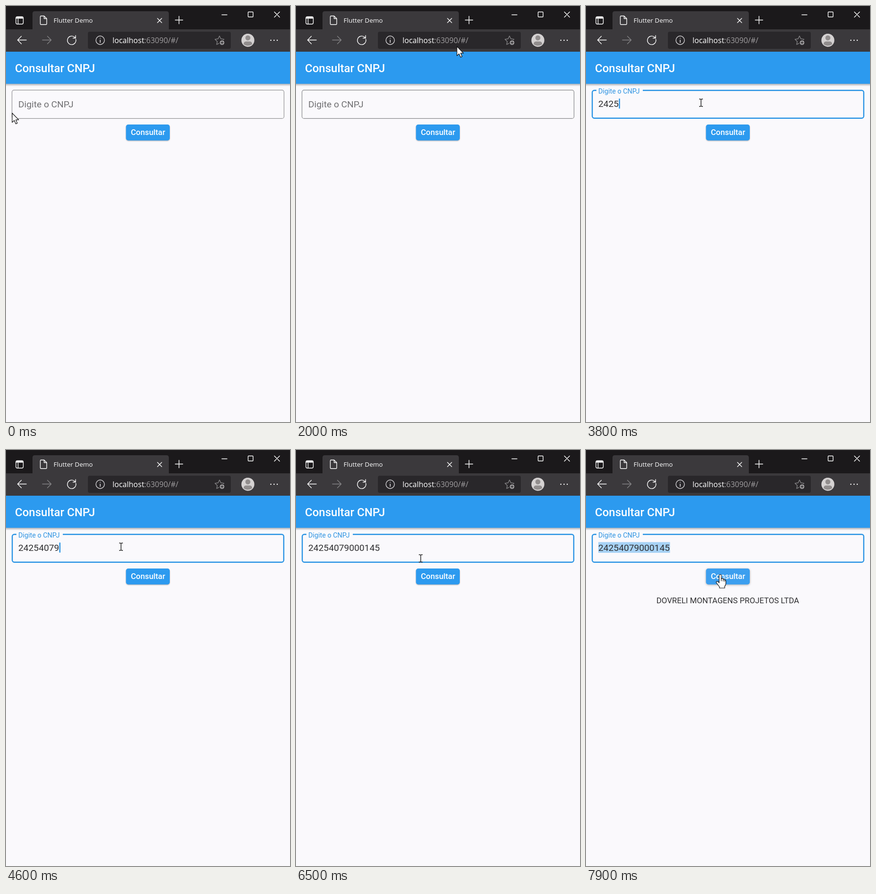
Animation, 600 px wide and 874 px high, one loop 8000 ms. Source, as an HTML page:

```html
<!DOCTYPE html>
<html lang="pt">
<head>
<meta charset="utf-8">
<title>Consultar CNPJ</title>
<style>
  html, body { margin: 0; width: 100%; height: 100%; overflow: hidden; background: #faf9fc; }
  svg { display: block; width: 100%; height: 100%; font-family: Roboto, sans-serif; }
  .chrome { font-family: "Open Sans", sans-serif; }
  .icons { fill: none; stroke: #fff; stroke-width: 1.4; stroke-linecap: round; stroke-linejoin: round; }
  .dim { stroke: #858486; }
  .cursor { fill: #fff; stroke: #111; stroke-width: 1.2; stroke-linejoin: round; }
</style>
</head>
<body>
<svg viewBox="0 0 600 874" preserveAspectRatio="none">
  <defs>
    <linearGradient id="shade" x2="0" y2="1">
      <stop stop-color="#000" stop-opacity=".3"/>
      <stop offset="1" stop-color="#000" stop-opacity="0"/>
    </linearGradient>
    <clipPath id="buttonClip"><rect x="253.5" y="249" width="92.5" height="33.5" rx="4.8"/></clipPath>
  </defs>
  <rect width="600" height="874" fill="#faf9fc"/>

  <!-- Browser window -->
  <g class="chrome">
    <rect width="600" height="50" fill="#1b191b"/>
    <path d="M56 50V16q0-5 5-5H339q5 0 5 5V50z" fill="#3b393c"/>
    <rect y="49" width="600" height="47" fill="#3b393c"/>
    <rect x="173" y="54" width="302" height="36" rx="4" fill="#29272a"/>
    <text x="100.5" y="35" font-size="13.5" fill="#fff">Flutter Demo</text>
    <text x="225" y="78" font-size="16" fill="#fff">localhost<tspan fill="#a09ea0">:63090/#/</tspan></text>
  </g>
  <g class="icons">
    <rect x="21" y="22.5" width="15.5" height="15.5" rx="3"/>
    <path d="M21.5 25.5H36M23 24H35" stroke-width="2"/>
    <path d="M25.5 27V37"/>
    <path d="M73.500 21H80.500L86 26.500V37.500q0 1.500-1.500 1.500H74q-1.500 0-1.500-1.500V22.500q0-1.500 1.500-1.500M80.500 21V26.500H86"/>
    <path d="M320 26l9 9m0-9l-9 9M357.500 29.500h16m-8-8v16M456 18.500h11M567 12.500l11 11m0-11l-11 11"/>
    <rect x="511.500" y="12.500" width="10.500" height="10.500" rx="1"/>
    <path d="M43 71.500H24.500m8-8l-8 8 8 8"/>
    <path class="dim" d="M77 71.500H95.500m-8-8l8 8-8 8"/>
    <path d="M147.500 70A9 9 0 1 1 143.500 64.500L146.500 67M147 62V67.500H141.500"/>
    <circle cx="199" cy="72" r="9" stroke="#d5d3d5"/>
    <path d="M199 71.500v5M199 67.500v.2" stroke="#d5d3d5" stroke-width="1.700"/>
    <path class="dim" d="M451 63l2.900 6 6.600.9-4.800 4.600 1.100 6.500-5.800-3.100-5.900 3.100 1.200-6.500-4.800-4.600 6.600-.9z"/>
    <circle cx="456.500" cy="77" r="5.500" fill="#a3a1a3" stroke="#29272a"/>
    <path d="M454 77h5m-2.500-2.500v5" stroke="#29272a"/>
    <path d="M559.500 72h.1M566.300 72h.1M573 72h.1" stroke-width="2.400"/>
  </g>
  <circle cx="511" cy="72" r="13.700" fill="#d5d2d2"/>
  <circle cx="511" cy="67" r="5.300" fill="#918d8d"/>
  <path d="M502 80.500q0-6 5-6h8q5 0 5 6-9 6-18 0z" fill="#918d8d"/>

  <!-- Page -->
  <rect y="163" width="600" height="6" fill="url(#shade)"/>
  <rect y="96" width="600" height="67.500" fill="#2c9aef"/>
  <text x="19" y="139" font-size="24" font-weight="500" fill="#fff">Consultar CNPJ</text>

  <rect id="border" rx="4.500" fill="none"/>
  <rect id="notch" x="22" y="174" height="6" fill="#faf9fc"/>
  <text id="label" x="26">Digite o CNPJ</text>
  <rect id="selection" x="26" y="193.500" width="151.500" height="22.500" fill="#a7d2f5"/>
  <text id="digits" x="26" y="211.500" font-size="19.200" fill="#303032"></text>
  <rect id="caret" y="194.500" width="2.400" height="21" fill="#2893e4"/>

  <rect id="button" x="253.500" y="249" width="92.500" height="33.500" rx="4.800"/>
  <circle id="ripple" cx="294" cy="266" fill="#fff" clip-path="url(#buttonClip)"/>
  <text x="300" y="271.300" font-size="16.800" font-weight="500" fill="#fff" text-anchor="middle">Consultar</text>

  <path id="spinner" fill="none" stroke="#2c9aef" stroke-width="4.800" stroke-linecap="square"/>
  <text id="result" x="299.500" y="322" font-size="16.800" fill="#303032" text-anchor="middle">DOVRELI MONTAGENS PROJETOS LTDA</text>

  <!-- Pointers, each with its hot spot at 0,0 -->
  <path id="arrow" class="cursor" d="M0 0V19.500L4.500 15.400 7.700 22.600 10.900 21.200 7.800 14.200H13.800z"/>
  <path id="beam" fill="none" stroke="#222" stroke-width="1.500" d="M-4-7.500H-1.500L0-6.500 1.500-7.500H4M0-6.500V7M-4 8H-1.500L0 7 1.500 8H4"/>
  <g id="hand" class="cursor">
    <path d="M-2.200 2Q-2 0 0 0Q2.200 0 2.200 2V9Q4 7.500 5.800 8.600Q6.300 9.200 6.300 10Q8 9 9.200 10.400Q9.600 11 9.600 11.800Q11.600 11 12 13.500V19Q12 22 9.500 25V28.500H-1.500V26L-8 17.500Q-9 15.500-7 14.500Q-5 14-2.200 17.500z"/>
    <path fill="none" d="M2.200 9V14M6.300 10V14.500M9.600 11.800V15"/>
  </g>
</svg>
<script>
const LOOP = 8000, STEP = 100;
const CNPJ = "24254079000145", DIGIT_WIDTH = 10.79;
const KEY_TIMES = [3200, 3400, 3600, 3800, 4000, 4200, 4400, 4600, 4800, 5000, 5200, 5400, 5700, 5900];
const FOCUS = 2430, PRESS = 6750, LOADING = 6830, RESPONSE = 7200, SELECT = 7900;
// time, x, y
const POINTER = [
  [0, 13, 225], [300, 120, 215], [600, 300, 262], [800, 372, 100], [900, 396, 17], [1000, 397, 23],
  [1599, 397, 23], [1600, 412, 26], [1800, 400, 3], [2000, 340, 85], [2200, 256, 188], [2300, 243, 203],
  [6400, 243, 203], [6600, 284, 252], [6700, 295, 265], [7899, 295, 265], [7900, 283.5, 261.5], [LOOP, 283.5, 261.5]
];

const el = Object.fromEntries([...document.querySelectorAll("svg [id]")].map(node => [node.id, node]));
const set = (node, attrs) => { for (const key in attrs) node.setAttribute(key, attrs[key]); };
const show = (node, visible) => set(node, { visibility: visible ? "visible" : "hidden" });
const clamp = x => Math.min(1, Math.max(0, x));
const mix = (a, b, p) => a + (b - a) * p;

// cubic-bezier(.4, 0, .2, 1)
function ease(x) {
  if (x <= 0 || x >= 1) return clamp(x);
  let low = 0, high = 1;
  for (let i = 0; i < 20; i++) {
    const u = (low + high) / 2, v = 1 - u;
    if (1.2 * v * v * u + .6 * v * u * u + u ** 3 < x) low = u; else high = u;
  }
  return low * low * (3 - 2 * low);
}

function pointerAt(t) {
  const i = POINTER.findIndex(key => key[0] > t);
  const [t0, x0, y0] = POINTER[i - 1], [t1, x1, y1] = POINTER[i];
  const p = (t - t0) / (t1 - t0);
  return [mix(x0, x1, p), mix(y0, y1, p)];
}

function drawField(t, hovered) {
  const focused = t >= FOCUS, inset = focused ? 1.2 : .6;
  set(el.border, {
    x: 12 + inset, y: 176 + inset, width: 576 - 2 * inset, height: 61 - 2 * inset,
    stroke: focused ? "#2893e4" : hovered ? "#757779" : t ? "#858789" : "#929294",
    "stroke-width": 2 * inset
  });
  const float = ease((t - FOCUS) / 167);
  set(el.notch, { width: 98 * float });
  set(el.label, {
    y: mix(212.5, 183.7, float), "font-size": mix(19.2, 14.4, float),
    fill: focused ? "#2e94e2" : "#707072"
  });

  const typed = KEY_TIMES.filter(time => time <= t);
  const lastAction = typed.at(-1) ?? FOCUS;
  el.digits.textContent = CNPJ.slice(0, typed.length);
  set(el.caret, { x: 26.3 + typed.length * DIGIT_WIDTH });
  show(el.caret, focused && t < SELECT && Math.floor((t - lastAction) / 500) % 2 === 0);
  show(el.selection, t >= SELECT);
}

function drawButton(t, hovered) {
  set(el.button, { fill: hovered ? "#3c9fef" : "#2c9aef" });
  const blur = hovered ? 2 : 1.2;
  el.button.style.filter = `drop-shadow(0 1.5px ${blur}px rgba(0,0,0,.32))`;
  set(el.ripple, {
    r: 22 + Math.max(0, t - PRESS - 50) * .15,
    opacity: t < PRESS ? 0 : .27 * clamp((7100 - t) / 200)
  });
}

function drawSpinner(t) {
  show(el.spinner, t >= LOADING && t < RESPONSE);
  const age = Math.max(0, t - LOADING);
  const rim = turn => {
    const angle = turn * 2 * Math.PI;
    return `${300 + 21.6 * Math.sin(angle)} ${584.5 - 21.6 * Math.cos(angle)}`;
  };
  const start = age / 2222 + age / 1333 / 4;
  const sweep = .75 * ease(age / 666.5) + .001;
  set(el.spinner, { d: `M${rim(start)}A21.6 21.6 0 ${sweep > .5 ? 1 : 0} 1 ${rim(start + sweep)}` });
}

function draw(now) {
  const t = Math.floor(now % LOOP / STEP) * STEP;
  const [x, y] = pointerAt(t);
  const onField = x > 14 && x < 588 && y > 176 && y < 237;
  const onButton = x > 253 && x < 346 && y > 249 && y < 283;

  drawField(t, onField);
  drawButton(t, onButton);
  drawSpinner(t);
  show(el.result, t >= RESPONSE);

  const active = onField ? el.beam : onButton ? el.hand : el.arrow;
  for (const cursor of [el.arrow, el.beam, el.hand]) show(cursor, cursor === active);
  set(active, { transform: `translate(${x} ${y})` });
}

const origin = performance.now();
function tick() {
  draw(performance.now() - origin);
  requestAnimationFrame(tick);
}
tick();
</script>
</body>
</html>
```
